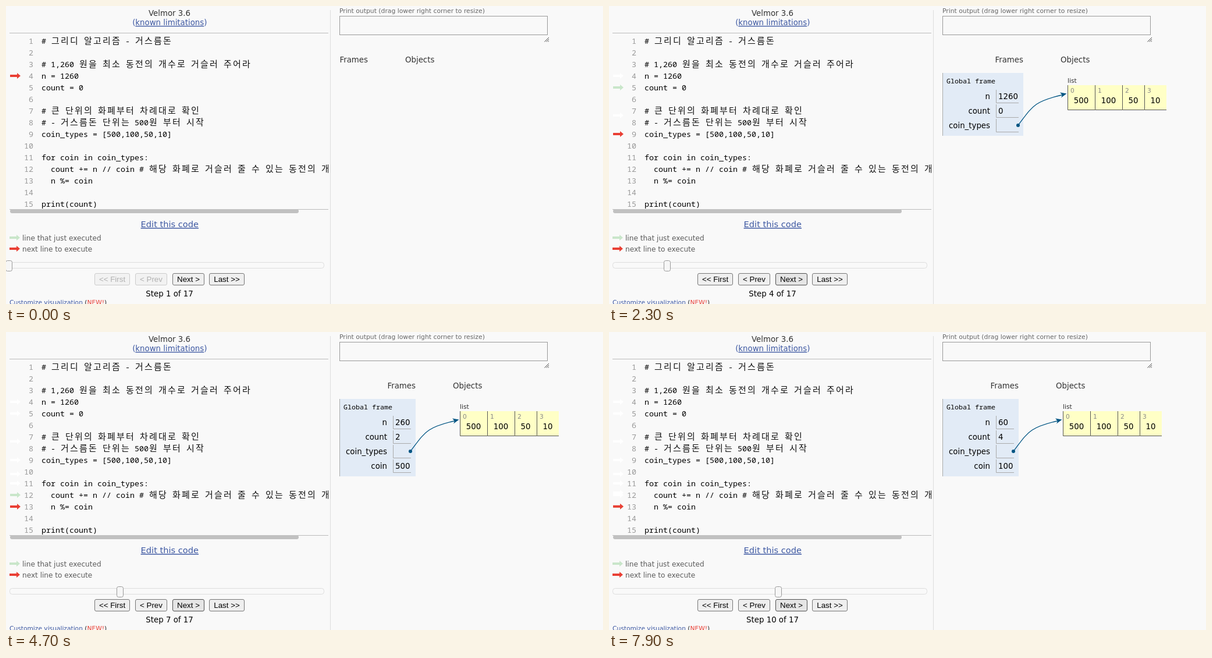
Animation of 1026x512 px, one loop 8 s. Source, as an HTML page:

```html
<!DOCTYPE html>
<html lang="ko">
<head>
<meta charset="utf-8">
<title>Code stepper</title>
<style>
  html, body { margin: 0; width: 100%; height: 100%; overflow: hidden; background: #f9f9f9; }
  svg { display: block; width: 1026px; height: 512px; font: 13.33px "DejaVu Sans", sans-serif; fill: #333; }
  .mono { font-family: "Noto Sans Mono", "Liberation Mono", monospace; font-weight: 300; fill: #000; }
  .hangul { font: 300 15px "Noto Sans CJK KR Light", "Noto Sans CJK KR DemiLight", "Noto Sans CJK KR", "Noto Sans CJK JP", sans-serif; fill: #111; }
  .num { font-family: "Noto Sans Mono", "Liberation Mono", monospace; font-weight: 300; fill: #999; text-anchor: end; }
  .btn { font-family: "Liberation Sans", Arial, sans-serif; text-anchor: middle; }
  .small { font-size: 10.67px; }
  .legend { font-size: 12.1px; fill: #5c5c5c; }
  .link { fill: #3d58a2; }
  .under { text-decoration: underline; }
  .mid { text-anchor: middle; }
  .end { text-anchor: end; }
  .line { fill: none; stroke: #aaa; }
  .val { fill: #000; }
</style>
</head>
<body>
<svg viewBox="0 0 1026 512">
  <defs>
    <polygon id="arrow" points="0,-2 12,-2 12,-5 18,0 12,5 12,2 0,2"/>
    <clipPath id="codeClip"><rect y="46" width="554" height="305"/></clipPath>
  </defs>
  <rect width="1026" height="512" fill="#f9f9f9"/>
  <path d="M557.5 7V512" stroke="#ddd"/>
  <text class="mid" x="281" y="17">Velmor 3.6</text>
  <text class="mid link" x="281.3" y="33">(<tspan class="under">known limitations</tspan>)</text>
  <path d="M6 46.5H554M6 349.5H554" stroke="#bbb"/>
  <g id="code" clip-path="url(#codeClip)"></g>
  <rect x="7" y="349" width="496" height="7" rx="3.5" fill="#c1c1c1"/>
  <text class="mid link under" x="281.3" y="380" font-size="14.6">Edit this code</text>
  <use href="#arrow" x="6" y="398" fill="#c9e6ca"/>
  <use href="#arrow" x="6" y="417" fill="#e93f34"/>
  <text class="legend" x="28" y="403">line that just executed</text>
  <text class="legend" x="28" y="422">next line to execute</text>
  <rect x="6.5" y="440.5" width="540" height="10" rx="4" fill="#f9f9f9" stroke="#ddd"/>
  <text class="small link" x="6" y="513">Customize visualization <tspan fill="#222">(</tspan><tspan fill="#e93f34">NEW!</tspan><tspan fill="#222">)</tspan></text>
  <text x="573" y="12" font-size="10.8" fill="#666">Print output (drag lower right corner to resize)</text>
  <rect x="573.5" y="17.5" width="357" height="32" fill="#f9f9f9" stroke="#999"/>
  <path d="M925.5 61.5L933 54M928.5 61.5L933 57M931.5 61.5L933 60" stroke="#444"/>
  <g id="state"></g>
</svg>
<script>
const code = [
  "# 그리디 알고리즘 - 거스름돈", "",
  "# 1,260 원을 최소 동전의 개수로 거슬러 주어라",
  "n = 1260", "count = 0", "",
  "# 큰 단위의 화폐부터 차례대로 확인",
  "# - 거스름돈 단위는 500원 부터 시작",
  "coin_types = [500,100,50,10]", "",
  "for coin in coin_types:",
  "  count += n // coin # 해당 화폐로 거슬러 줄 수 있는 동전의 개수",
  "  n %= coin", "",
  "print(count)"
];
const steps = [
  { line: 4 },
  { line: 5, n: 1260 },
  { line: 9, n: 1260, count: 0 },
  { line: 11, n: 1260, count: 0, list: 1 },
  { line: 12, n: 1260, count: 0, list: 1, coin: 500 },
  { line: 13, n: 1260, count: 2, list: 1, coin: 500 },
  { line: 11, n: 260, count: 2, list: 1, coin: 500 },
  { line: 12, n: 260, count: 2, list: 1, coin: 100 },
  { line: 13, n: 260, count: 4, list: 1, coin: 100 },
  { line: 11, n: 60, count: 4, list: 1, coin: 100 }
];
const clicks = [1000, 1500, 2300, 3100, 3800, 4700, 5800, 6800, 7700];
const presses = [900, 1400, 2200, 3000, 3700, 4600, 5600, 6600, 7600];
const LOOP = 8000, TICK = 100, HOVER = 400, FADE = 170, MOVE = 250;

const esc = s => String(s).replace(/&/g, "&amp;").replace(/</g, "&lt;");
const text = (x, y, s, cls = "") => `<text x="${x}" y="${y}" class="${cls}">${esc(s)}</text>`;
const arrow = (y, fill) => `<use href="#arrow" x="7" y="${y}" fill="${fill}"/>`;
const lineY = n => 40 + 20 * n;
const ease = p => p < 0.5 ? 4 * p ** 3 : 1 - 4 * (1 - p) ** 3;
const clamp = p => Math.max(0, Math.min(1, p));
const isHangul = c => c >= "가";

// Fixed grid: Latin takes one 8px column, Hangul takes two.
function codeLine(s, i) {
  const y = lineY(i + 1) + 5;
  let x = 61, out = text(47, y, i + 1, "num");
  for (const run of s.match(/[가-힣]+|[!-~]+| +/g) || []) {
    const wide = isHangul(run), w = wide ? 16 : 8;
    const xs = [...run].map((_, k) => x + k * w + (wide ? 1 : 0)).join(" ");
    if (run.trim()) out += text(xs, y, run, wide ? "hangul" : "mono");
    x += run.length * w;
  }
  return out;
}

// The old arrow fades to white, reappears under the red one, then red moves on.
function gutter(k, since) {
  let out = "";
  for (let j = 1; j <= k; j++) {
    const age = j < k ? LOOP : since;
    const from = steps[j - 1].line, to = steps[j].line;
    if (j > 1 && age >= FADE) out += arrow(lineY(steps[j - 2].line), "#fff");
    if (Math.abs(to - from) > 1 && age >= 400) out += arrow(lineY(from + (to - from) * 0.6), "#fff");
  }
  if (!k) return out + arrow(lineY(steps[0].line), "#e93f34");
  const from = lineY(steps[k - 1].line), to = lineY(steps[k].line);
  if (since >= FADE) out += arrow(from, "#c9e6ca");
  else if (k > 1) {
    const p = since / FADE, mix = c => Math.round(c + (255 - c) * p);
    out += arrow(lineY(steps[k - 2].line), `rgb(${mix(201)},${mix(230)},${mix(202)})`);
  }
  const p = since >= 400 ? 1 : ease(clamp((since - FADE) / MOVE));
  return out + arrow(from + (to - from) * p, "#e93f34");
}

function button(x, w, label, mode) {
  const [bg, edge, ink] = {
    off: ["#f2f2f2", "#ccc", "#b0b0b0"],
    on: ["#efefef", "#767676", "#000"],
    hover: ["#e5e5e5", "#4f4f4f", "#000"],
    down: ["#f5f5f5", "#8d8d8d", "#000"]
  }[mode];
  return `<rect x="${x + 0.5}" y="459.5" width="${w - 1}" height="20" rx="2.5" fill="${bg}" stroke="${edge}"/>` +
    `<text class="btn" x="${x + w / 2}" y="474" fill="${ink}">${esc(label)}</text>`;
}

function controls(k, t) {
  const held = presses.some((p, i) => t >= p && t < clicks[i]);
  const back = k ? "on" : "off";
  const x = Math.round(31.75 * k) - 0.5;
  return `<rect x="${x}" y="437.5" width="11" height="18" rx="3" fill="#f6f6f6" stroke="#999"/>` +
    button(152, 61, "<< First", back) + button(222, 55, "< Prev", back) +
    button(286, 55, "Next >", held ? "down" : t >= HOVER ? "hover" : "on") +
    button(349, 61, "Last >>", "on") +
    text(281, 499, `Step ${k + 1} of 17`, "mid val");
}

function heapList(x) {
  let out = text(x, 132, "list", "small"), left = x;
  [500, 100, 50, 10].forEach((v, i) => {
    const w = v < 100 ? 38 : 47;
    out += `<rect x="${left}" y="136" width="${w}" height="43" fill="#ffffc6"/>` +
      `<path class="line" style="stroke:#555" d="M${left + 0.5} 136V178.5H${left + w}"/>` +
      `<text class="small" x="${left + 5}" y="149" fill="#888">${i}</text>` +
      text(left + w / 2, 167, v, "mid val");
    left += w;
  });
  return out;
}

function memory(s) {
  const rows = [["n", s.n], ["count", s.count], ["coin_types", s.list && ""], ["coin", s.coin]]
    .filter(r => r[1] !== undefined);
  const boxX = s.list ? 665 : rows.length > 1 ? 631 : 623;
  const right = rows.length ? boxX + (s.n > 999 ? 47 : 39) : 622;
  let out = text(right, 97, "Frames", "end") + text(right + 64, 97, "Objects");
  if (!rows.length) return out;
  const h = 33 + 25 * rows.length;
  out += `<rect x="573" y="115" width="${right - 573}" height="${h}" fill="#e2ebf6"/>` +
    `<path class="line" d="M573.5 115v${h}"/>` +
    `<text class="mono" x="580" y="132.5" font-size="11.67">Global frame</text>`;
  rows.forEach(([name, v], i) => {
    const y = 160 + 25 * i;
    out += text(boxX - 10, y, name, "end val") + text(boxX + 4, y, v, "val") +
      `<path class="line" d="M${boxX + 0.5} ${y - 16}V${y + 6.5}H${right - 8}"/>`;
  });
  if (s.list) out += heapList(right + 76) +
    `<g transform="translate(${right - 712})" fill="#005583">
      <path d="M703 205C728 172 730 164 780 152.5" fill="none" stroke="#005583" stroke-width="1.3"/>
      <circle cx="703" cy="205" r="3"/><path d="M786.5 150.5L775 148.5L779 152.7L777 157.5Z"/></g>`;
  return out;
}

const stage = document.getElementById("state");
document.getElementById("code").innerHTML = code.map(codeLine).join("");

let shown = -1;
function draw() {
  const t = Math.floor(performance.now() % LOOP / TICK) * TICK;
  if (t !== shown) {
    shown = t;
    const k = clicks.filter(c => c <= t).length;
    stage.innerHTML = gutter(k, k ? t - clicks[k - 1] : 0) + controls(k, t) + memory(steps[k]);
  }
  requestAnimationFrame(draw);
}
draw();
</script>
</body>
</html>
```
